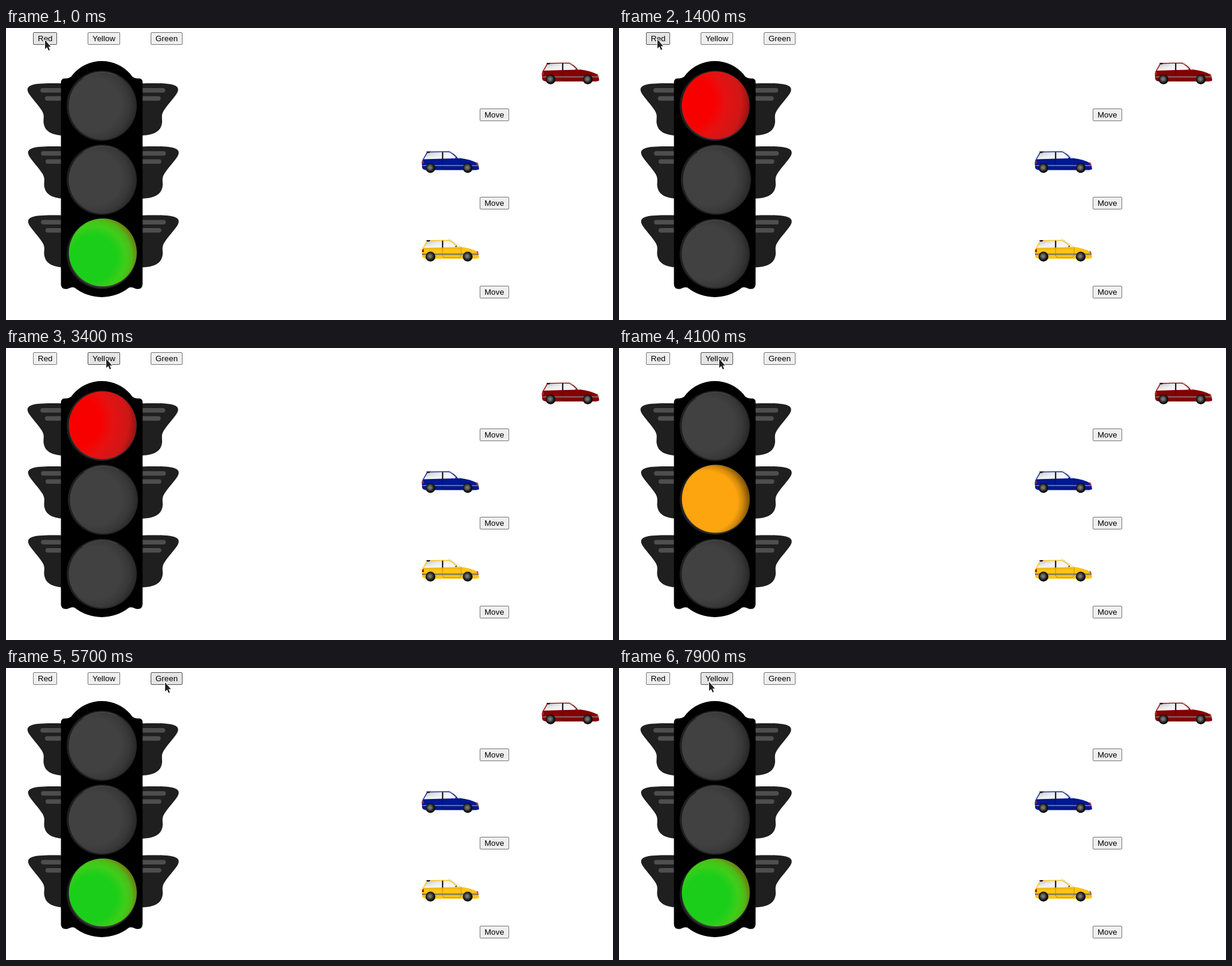
An HTML page for the animation above (8 s loop, 1011x486 px).

```html
<!DOCTYPE html>
<html lang="en">
<head>
<meta charset="utf-8">
<title>Traffic light</title>
<style>
  html, body { margin: 0; width: 100%; height: 100%; overflow: hidden; background: #fff; }
  svg { position: absolute; left: 0; top: 0; }
  .button {
    position: absolute; box-sizing: border-box; height: 21px; padding: 2px 7px;
    border: 1px solid #767676; border-radius: 2px; background: #efefef; color: #000;
    font: 13.3333px/15px "Liberation Sans", Arial, sans-serif; white-space: nowrap;
  }
  /* Every change is a hard step on one shared 8 s timeline (1% = 80 ms). */
  .button, .lit, #middle, #cursor { animation: 8s step-end infinite; }
  #red { animation-name: press-red; }
  #yellow { animation-name: press-yellow; }
  #green { animation-name: press-green; }
  #red-lit { animation-name: light-red; }
  #yellow-lit { animation-name: light-yellow; }
  #green-lit { animation-name: light-green; }
  #middle { animation-name: nudge; }
  #cursor { animation-name: point; }

  @keyframes press-red {
    0%, 17.5% { background: #e5e5e5; border-color: #4f4f4f; }
    16.25% { background: #f5f5f5; border-color: #8d8d8d; }
    36.25%, 100% { background: #efefef; border-color: #767676; }
  }
  @keyframes press-yellow {
    0%, 55% { background: #efefef; border-color: #767676; }
    40%, 98.75%, 100% { background: #e5e5e5; border-color: #4f4f4f; }
  }
  @keyframes press-green {
    0%, 80%, 100% { background: #efefef; border-color: #767676; }
    62.5%, 71.25% { background: #e5e5e5; border-color: #4f4f4f; }
    68.75% { background: #f5f5f5; border-color: #8d8d8d; }
  }
  @keyframes light-red { 0%, 51.25%, 100% { opacity: 0; } 17.5% { opacity: 1; } }
  @keyframes light-yellow { 0%, 71.25%, 100% { opacity: 0; } 51.25% { opacity: 1; } }
  @keyframes light-green { 0%, 71.25%, 100% { opacity: 1; } 17.5% { opacity: 0; } }
  @keyframes nudge { 0%, 51.25%, 100% { transform: none; } 17.5% { transform: translate(2px, 0); } }
  @keyframes point {
    0% { transform: translate(65px, 20px); }
    3.75% { transform: translate(64px, 19px); }
    35% { transform: translate(77px, 14px); }
    36.25% { transform: translate(91px, 13px); }
    37.5% { transform: translate(107px, 13px); }
    38.75% { transform: translate(125px, 14px); }
    40% { transform: translate(143px, 15px); }
    41.25% { transform: translate(158px, 17px); }
    42.5% { transform: translate(167px, 18px); }
    55% { transform: translate(166px, 19px); }
    57.5% { transform: translate(218px, 30px); }
    58.75% { transform: translate(269px, 36px); }
    62.5% { transform: translate(270px, 32px); }
    65% { transform: translate(265px, 24px); }
    80% { transform: translate(255px, 26px); }
    81.25% { transform: translate(229px, 28px); }
    82.5% { transform: translate(201px, 29px); }
    83.75% { transform: translate(172px, 30px); }
    85% { transform: translate(145px, 30px); }
    86.25% { transform: translate(118px, 30px); }
    87.5% { transform: translate(90px, 30px); }
    88.75% { transform: translate(65px, 29px); }
    91.25% { transform: translate(85px, 29px); }
    92.5% { transform: translate(117px, 29px); }
    93.75% { transform: translate(142px, 28px); }
    96.25% { transform: translate(149px, 27px); }
    98.75%, 100% { transform: translate(150px, 23px); }
  }
</style>
</head>
<body>
<svg width="1011" height="486" viewBox="0 0 1011 486">
  <defs>
    <radialGradient id="off-fill" cx=".38" cy=".48" r=".65">
      <stop offset=".6" stop-color="#414141"/>
      <stop offset=".8" stop-color="#383838"/>
      <stop offset="1" stop-color="#242424"/>
    </radialGradient>
    <radialGradient id="red-fill" cx=".1" cy=".45" r=".92">
      <stop offset=".4" stop-color="#f90000"/>
      <stop offset=".6" stop-color="#e41212"/>
      <stop offset=".85" stop-color="#cf1717"/>
      <stop offset="1" stop-color="#8c1212"/>
    </radialGradient>
    <radialGradient id="yellow-fill" cx=".37" cy=".54" r=".64">
      <stop offset=".7" stop-color="#fda50f"/>
      <stop offset=".82" stop-color="#d48a0c"/>
      <stop offset="1" stop-color="#704a06"/>
    </radialGradient>
    <radialGradient id="green-fill" cx=".36" cy=".58" r=".66">
      <stop offset=".5" stop-color="#1bce19"/>
      <stop offset=".72" stop-color="#3dce1a"/>
      <stop offset=".86" stop-color="#4fba17"/>
      <stop offset="1" stop-color="#717810"/>
    </radialGradient>
    <radialGradient id="tyre" cx=".45" cy=".45">
      <stop offset="0" stop-color="#888"/>
      <stop offset=".5" stop-color="#555"/>
      <stop offset=".75" stop-color="#282828"/>
      <stop offset="1" stop-color="#0c0c0c"/>
    </radialGradient>
    <linearGradient id="glass" x2="1" y2=".7">
      <stop offset="0" stop-color="#bbb"/>
      <stop offset=".45" stop-color="#eceeed"/>
      <stop offset="1" stop-color="#fff"/>
    </linearGradient>

    <g id="fin">
      <path d="M100 92.500C70 91.500 52 92 43 95C35.500 97.500 34 102 38 109C42 116 54 128 60 138C65 146 61.500 152 62.800 159C65 171 74 179 100 179Z" fill="#1f1f1f"/>
      <path d="M61 103.700H100M68.500 117.200H100" stroke="#4e4e4e" stroke-width="7.400" stroke-linecap="round"/>
    </g>
    <g id="fins">
      <use href="#fin"/>
      <use href="#fin" transform="matrix(-1 0 0 1 322.500 0)"/>
    </g>
    <g id="lamp">
      <circle r="58.500" fill="#1f1f1f"/>
      <circle cx="1.200" cy=".3" r="56.200" fill="url(#off-fill)"/>
      <path d="M-31 -46A56 56 0 0 1 26 -50" fill="none" stroke="#4b4b4b" stroke-width="1.200"/>
    </g>

    <g id="wheel">
      <circle r="8.200" fill="#151515"/>
      <circle r="7.400" fill="url(#tyre)"/>
    </g>
    <g id="car">
      <path d="M44 .5L52 4" stroke="#d5d0bd" stroke-width=".8"/>
      <path d="M2.500 16L9 3.500H46Q54 6 65 14.500Z" fill="url(#glass)"/>
      <path d="M3 16L10 4Q25 3 46 3.500Q53 6.500 60 14.500" fill="none" stroke="currentColor" stroke-width="1.400"/>
      <path d="M46 3.500Q55 6 66 14.500" fill="none" stroke="#bbb8aa" stroke-width=".6"/>
      <path d="M2 16L35 15L65 14.200Q82 16 93 22.500L95 26L96 32Q95 34 87 34H7Q1 33 1 29L.5 21Z" fill="currentColor"/>
      <path d="M35.200 4V15.500" stroke="#191919" stroke-width="2.200"/>
      <path d="M8 3H15L13 5.500H9.500Z" fill="#241818"/>
      <path d="M35 16V28L37 32H64L66 27V15" fill="none" stroke="#000" stroke-opacity=".38" stroke-width=".7"/>
      <path d="M2 17.500H64" stroke="#000" stroke-opacity=".2" stroke-width=".7"/>
      <path d="M1 26.600H95" stroke="#55504e" stroke-width="2"/>
      <path d="M3 26.300H94" stroke="#aaa" stroke-width=".7"/>
      <path d="M55.500 14.500L58.500 11.500V14.500Z" fill="#333"/>
      <path d="M1 19L4 18V23H1Z" fill="#b21b18"/>
      <path d="M91.500 20.500L94 22L95 26L92.500 25Z" fill="#c84a33"/>
      <use href="#wheel" x="15" y="30.500"/>
      <use href="#wheel" x="77" y="30.500"/>
    </g>
  </defs>

  <use href="#fins"/>
  <use href="#fins" x="1" y="105"/>
  <use href="#fins" x="1" y="219.500"/>
  <path d="M91.500 90Q92 84.500 97 84C104 84 108 83 111.500 77A63.500 63.500 0 0 1 207.500 77C211 83 215 84 222 84Q227.500 84.500 227.500 90V427Q227 434.500 219 434.500C214 434 211 430 205 432A73 73 0 0 1 114 432C108 430 105 434 100 434.500Q92 434.500 91.500 427Z"/>

  <use href="#lamp" x="159.500" y="129.500"/>
  <g id="middle"><use href="#lamp" x="159.500" y="252.500"/></g>
  <use href="#lamp" x="159.500" y="376"/>
  <circle class="lit" id="red-lit" cx="161" cy="128.500" r="56.200" fill="url(#red-fill)"/>
  <circle class="lit" id="yellow-lit" cx="161.300" cy="251" r="56.500" fill="url(#yellow-fill)"/>
  <circle class="lit" id="green-lit" cx="161.300" cy="373.500" r="56.500" fill="url(#green-fill)"/>

  <use href="#car" x="892" y="55" color="#860000"/>
  <use href="#car" x="692" y="202.500" color="#001894"/>
  <use href="#car" x="692" y="350" color="#ffc414"/>
</svg>

<div class="button" id="red" style="left:45px;top:7px">Red</div>
<div class="button" id="yellow" style="left:136px;top:7px">Yellow</div>
<div class="button" id="green" style="left:241px;top:7px">Green</div>
<div class="button" style="left:789px;top:134px">Move</div>
<div class="button" style="left:789px;top:281px">Move</div>
<div class="button" style="left:789px;top:429px">Move</div>

<svg width="1011" height="486" viewBox="0 0 1011 486">
  <g id="cursor">
    <path d="M0 0V15L3.400 12L5.800 17.500L8 16.500L5.700 11.200H9.700Z" fill="#222" stroke="#fff" stroke-width="1.800" stroke-linejoin="round" paint-order="stroke"/>
  </g>
</svg>
</body>
</html>
```
